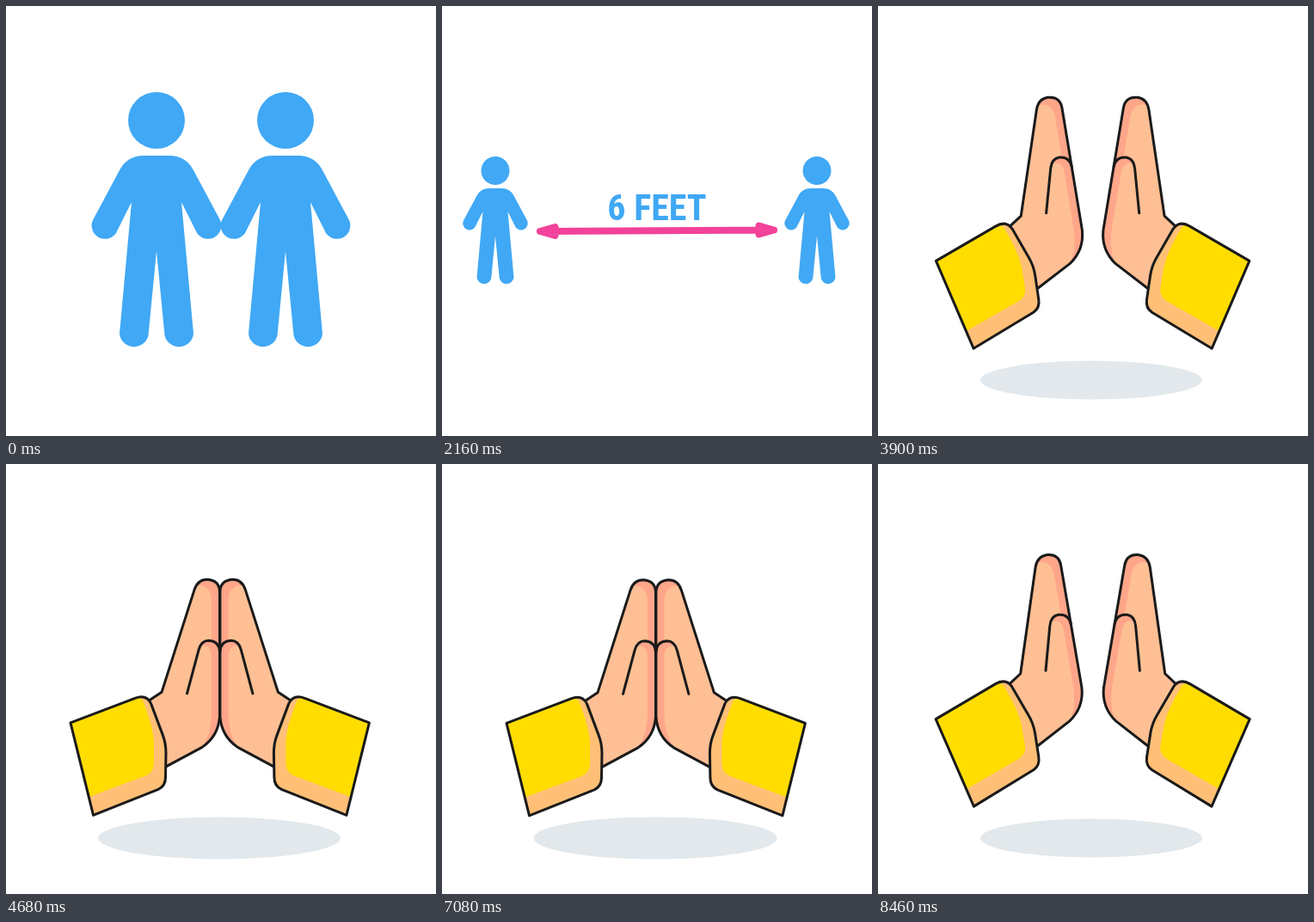
An HTML page for the animation above (8.48 s loop, 500x500 px).

```html
<!DOCTYPE html>
<html lang="en">
<head>
<meta charset="utf-8">
<title>Keep your distance</title>
<style>
html, body { margin: 0; width: 100%; height: 100%; overflow: hidden; background: #fff; }
svg { display: block; width: 100vw; height: 100vh; }
text { font: 600 42px "Roboto Condensed", "Open Sans Condensed", "Noto Sans", sans-serif; font-stretch: 62.5%; text-anchor: middle; }
.ink { fill: none; stroke: #1a1a1a; stroke-width: 3; stroke-linejoin: round; stroke-linecap: round; }
</style>
</head>
<body>
<svg viewBox="0 0 500 500">
  <defs>
    <g id="person">
      <circle cy="-117" r="33"/>
      <path d="M-15-76H15Q34-76 43-59L74-1A15.5 15.5 0 0 1 47 14L29-22 43 131A17 17 0 0 1 9.5 133L0 35-9.5 133A17 17 0 0 1-43 131L-29-22-47 14A15.5 15.5 0 0 1-74-1L-43-59Q-34-76-15-76Z"/>
    </g>
    <path id="cuff" d="M75 292.5L150 264Q163 259 168.5 270L182 306Q186 316 186 328L185.5 356Q185.5 366 177 370L101.5 400Z"/>
    <g id="hand">
      <path fill="#ffbf94" d="M166 267L181 257 219 138Q223 126 234 126 248.5 127 248.5 141V285Q247 308 228 321L187 343Z"/>
      <g fill="#ffa68a">
        <path d="M222 133Q226 126 234 126 248.5 127 248.5 141V208H239V150Q238 132 222 133Z"/>
        <path d="M227 203Q231 197 236 197 248 198 248.5 210V285Q247 308 228 321 239 305 239 280V215Q238 201 227 203Z"/>
      </g>
      <path class="ink" d="M166 267L181 257 219 138Q223 126 234 126 248.5 127 248.5 141V285Q247 308 228 321L187 343"/>
      <path class="ink" d="M210.5 258.5L224 208Q227 197 236 197 248 198 248.5 210"/>
      <use href="#cuff" fill="#ffbf77"/>
      <path fill="#ffdd00" d="M75 292.5L150 264Q159 262 161 272 172 300 172 318V340Q172 350 163 354L96 379Z"/>
      <use href="#cuff" class="ink"/>
    </g>
  </defs>

  <g id="distance" fill="#40a8f5">
    <use id="left" href="#person"/>
    <use id="right" href="#person"/>
    <path id="arrow" fill="none" stroke="#f2429a" stroke-width="8" stroke-linecap="round" stroke-linejoin="round"/>
    <text id="label">6 FEET</text>
  </g>

  <g id="greeting">
    <ellipse id="shadow" cx="248" cy="435" fill="#e2e8eb"/>
    <g id="pair">
      <use class="palm" href="#hand"/>
      <g id="mirror"><use class="palm" href="#hand"/></g>
    </g>
  </g>
</svg>
<script>
const LOOP = 8480, SWITCH = 3840, BOB = 1160;
const $ = id => document.getElementById(id);
const set = (el, attrs) => { for (const k in attrs) el.setAttribute(k, attrs[k]); };
const span = (t, a, b) => Math.min(1, Math.max(0, (t - a) / (b - a)));
const cubic = u => u < .5 ? 4 * u ** 3 : 1 - 4 * (1 - u) ** 3;
const smooth = u => u * u * (3 - 2 * u);
const ease = (t, a, b) => cubic(span(t, a, b));

function drawArrow(width, head) {
  const x = width / 2 - 4, len = head * width / 16, h = 5 * head;
  const chevron = (tip, y, back) => head ? `M${tip + back} ${y - h}L${tip} ${y}L${tip + back} ${y + h}` : '';
  set($('arrow'), {
    visibility: x > 0 ? 'inherit' : 'hidden',
    d: `M${250 - x} 262L${250 + x} 260.5` + chevron(250 - x, 262, len) + chevron(250 + x, 260.5, -len)
  });
}

function drawDistance(t) {
  const apart = ease(t, 905, 1790) - ease(t, 2640, 3363);
  const keep = 1 - ease(t, 2640, 3276);
  const scale = 1 - apart / 2;
  set($('left'), { transform: `translate(${175 - 113 * apart} 250) scale(${scale})` });
  set($('right'), { transform: `translate(${325 + 111 * apart} 250) scale(${scale})` });
  drawArrow(280 * (t < 2640 ? apart : keep), ease(t, 1600, 1850));
  set($('label'), { transform: `translate(250 249) scale(${ease(t, 1050, 1477) * keep})` });
}

function drawGreeting(t) {
  const beat = t / BOB, part = cubic(beat % 1);
  const low = Math.floor(beat) % 2 ? 1 - part : part;
  const open = 1 - smooth(span(t, 0, 540)) + smooth(span(t, 3460, 4000));
  set($('shadow'), { rx: 129 + 13 * low, ry: 22.4 + 2.2 * low });
  set($('pair'), { transform: `translate(0 ${10 * low - .8})` });
  set($('mirror'), { transform: `translate(${497.4 + 2 * open}) scale(-1 1)` });
  document.querySelectorAll('.palm').forEach(p => set(p, { transform: `rotate(${-9.7 * open} 100 341)` }));
}

function frame() {
  const t = performance.now() % LOOP, first = t < SWITCH;
  set($('distance'), { visibility: first ? 'visible' : 'hidden' });
  set($('greeting'), { visibility: first ? 'hidden' : 'visible' });
  if (first) drawDistance(t); else drawGreeting(t - SWITCH);
  requestAnimationFrame(frame);
}
frame();
</script>
</body>
</html>
```
